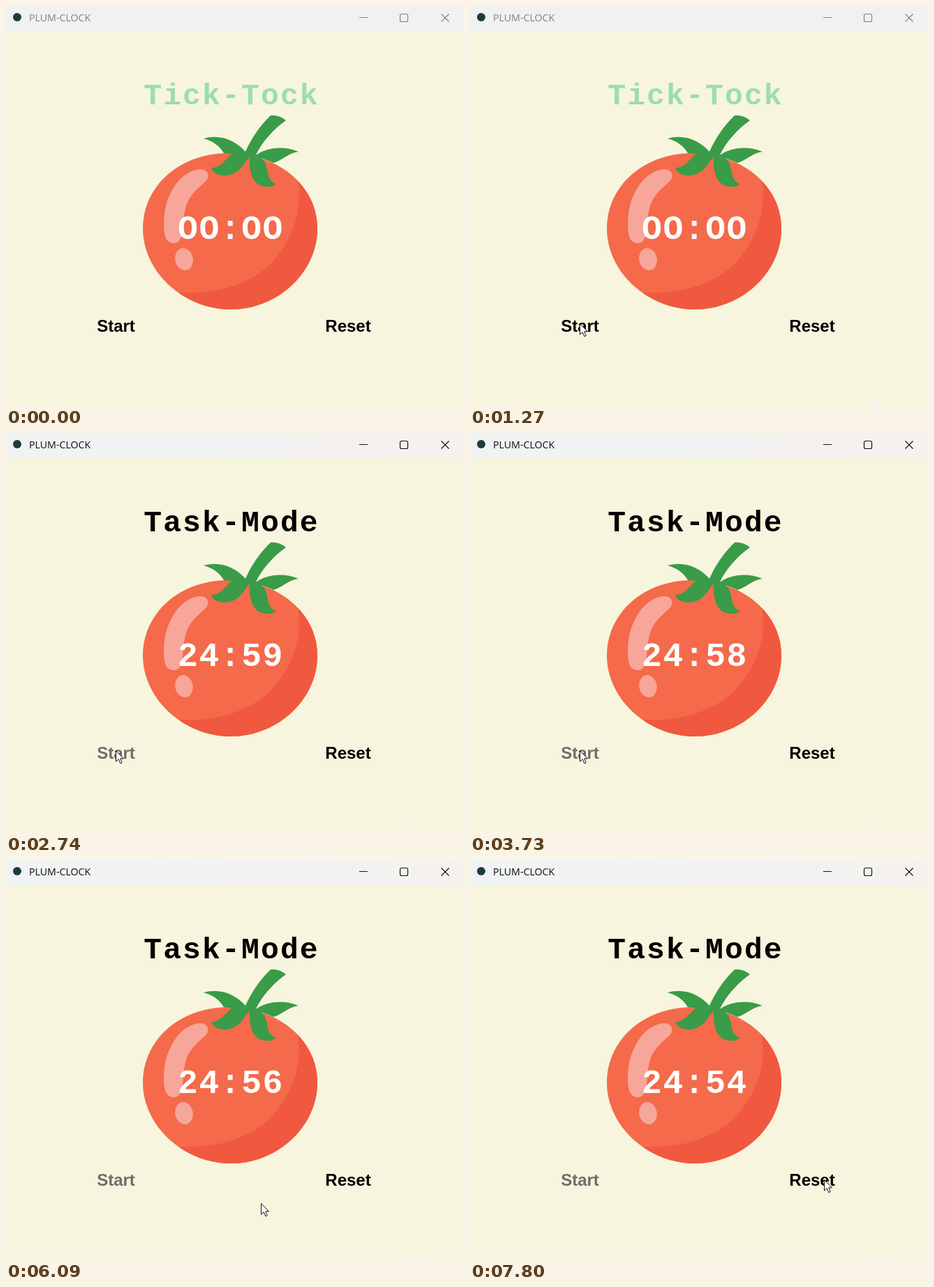
An HTML page that plays this animation: 656 by 572 pixels, repeating every 8000 ms.

```html
<!DOCTYPE html>
<html lang="en">
<head>
<meta charset="utf-8">
<title>PLUM-CLOCK</title>
<style>
  html, body { margin: 0; width: 100%; height: 100%; overflow: hidden; background: #f7f5dd; }
  svg { display: block; width: 656px; height: 572px; }
  .bar { fill: #f1f1f1; }
  .caption { font: 14.2px "Open Sans", "Noto Sans", sans-serif; fill: #858579; }
  .controls { fill: none; stroke: #7d8580; stroke-width: 1.2; }
  .focused .bar { fill: url(#glass); }
  .focused .caption { fill: #111; }
  .focused .controls { stroke: #111; }
  .mono { font-family: "Liberation Mono", "Courier New", monospace; font-weight: bold; text-anchor: middle; }
  #heading { font-size: 43px; letter-spacing: .05em; fill: #9bdeac; }
  #clock { font-size: 48px; letter-spacing: .033em; fill: #fff; }
  .button { font: bold 24px "Liberation Sans", Arial, sans-serif; text-anchor: middle; }
  #press { fill: #f0f0f0; visibility: hidden; }
  .pressed #press { visibility: visible; }
  .running #heading { fill: #000; }
  .running #start { fill: #6d6d6d; }
</style>
</head>
<body>
<svg id="stage" viewBox="0 0 656 572">
  <defs>
    <linearGradient id="glass">
      <stop offset="0" stop-color="#f0f3f3"/>
      <stop offset=".5" stop-color="#f2f2f3"/>
      <stop offset="1" stop-color="#f5f2ee"/>
    </linearGradient>
    <clipPath id="skin">
      <path d="M196 319C196 257 250 211 318 211C390 211 446 258 446 319C446 381 390 435 322 435C254 435 196 381 196 319Z"/>
    </clipPath>
  </defs>

  <rect width="656" height="572" fill="#f7f5dd"/>
  <rect class="bar" width="656" height="36"/>
  <circle cx="16" cy="16" r="6" fill="#1f3b3a"/>
  <text class="caption" x="33" y="22">PLUM-CLOCK</text>
  <g class="controls">
    <path d="M506 16.5H518M623.5 11.5L634.5 22.5M634.5 11.5L623.5 22.5"/>
    <rect x="564.5" y="11.5" width="11" height="11" rx="2"/>
  </g>

  <text id="heading" class="mono" x="323" y="141"></text>

  <g clip-path="url(#skin)">
    <rect x="190" y="205" width="262" height="236" fill="#f46a4a"/>
    <path fill="#f15840" d="M418 249C427 299 404 348 373 375C338 404 295 413 249 411V441H452V249Z"/>
  </g>
  <g fill="#f7a699">
    <path d="M277 234C287 233 293 242 287 250C281 257 268 265 261 279C253 296 255 313 252 327C250 336 246 341 239 340C229 339 226 330 226 312C226 271 249 237 277 234Z"/>
    <ellipse cx="255" cy="363" rx="12.7" ry="16" transform="rotate(-12 255 363)"/>
  </g>
  <g fill="#3a9b49">
    <path d="M342 211C351 190 364 171 379 157C387 156 395 159 401 164C383 177 368 193 357 215L349 218Z"/>
    <path d="M283 190C307 183 330 193 344 210L335 213L312 211C307 202 298 194 283 190Z"/>
    <path d="M350 214C341 225 334 243 313 243C303 243 295 238 294 232C312 233 316 211 331 210L344 209Z"/>
    <path d="M356 215C371 204 396 199 419 209C403 211 397 221 383 225C375 221 366 218 356 215Z"/>
    <path d="M349 214C348 230 350 249 362 256C371 261 382 260 387 255C372 250 377 234 370 223C367 218 362 215 356 213Z"/>
  </g>
  <text id="clock" class="mono" x="322" y="334"></text>

  <rect id="press" x="120" y="437" width="75" height="44"/>
  <text id="start" class="button" x="157.5" y="467">Start</text>
  <text class="button" x="490" y="467">Reset</text>

  <path id="smudge" fill="#f5f5f8" d="M580 562L590 572H580Z"/>
  <path id="cursor" fill="#fff" stroke="#111" stroke-linejoin="round"
        d="M.5 .5V16L4.2 12.7L6.8 18.7L9.2 17.6L6.7 11.8H11.5Z"/>
</svg>

<script>
  const LOOP = 8000, FOCUS = 1530, PRESS = 1600, RUN = 1725, SECOND = 1001;
  const ENTER = 390, LEAVE = 5740, RETURN = 6630, FRAME = 70;
  const $ = id => document.getElementById(id);
  const stage = $('stage');

  // Resting places of the pointer.
  const edge = [580, 562], onStart = [157, 455], below = [365, 492], onReset = [507, 458];

  const easeOut = u => 1 - (1 - u) ** 2;

  function sweep(elapsed, duration, a, b, c, d) {
    const held = Math.floor(elapsed / FRAME) * FRAME;
    const e = easeOut(Math.min(held / duration, 1)), r = 1 - e;
    return a.map((v, i) => Math.round(
      r ** 3 * v + 3 * r * r * e * b[i] + 3 * r * e * e * c[i] + e ** 3 * d[i]));
  }

  function cursorAt(t) {
    if (t >= RETURN) return sweep(t - RETURN, 1120, below, [540, 490], [525, 475], onReset);
    if (t >= LEAVE) return sweep(t - LEAVE, 350, onStart, [180, 462], [330, 492], below);
    return sweep(t - ENTER, 840, edge, [330, 320], [64, 415], onStart);
  }

  function clockText(t) {
    const left = t < RUN ? 0 : 25 * 60 - Math.floor((t - RUN) / SECOND);
    const pad = n => String(n).padStart(2, '0');
    // The mono font dots its zero; a capital O gives the open shape.
    return `${pad(Math.floor(left / 60))}:${pad(left % 60)}`.replace(/0/g, 'O');
  }

  function show(el, visible) {
    el.style.display = visible ? '' : 'none';
  }

  function draw() {
    const t = performance.now() % LOOP;
    const running = t >= RUN;
    stage.classList.toggle('focused', t >= FOCUS);
    stage.classList.toggle('pressed', t >= PRESS && !running);
    stage.classList.toggle('running', running);
    $('heading').textContent = running ? 'Task-Mode' : 'Tick-Tock';
    $('clock').textContent = clockText(t);

    show($('cursor'), t >= ENTER);
    show($('smudge'), t >= ENTER + FRAME);
    $('cursor').setAttribute('transform', `translate(${cursorAt(Math.max(t, ENTER))})`);
    requestAnimationFrame(draw);
  }
  draw();
</script>
</body>
</html>
```
